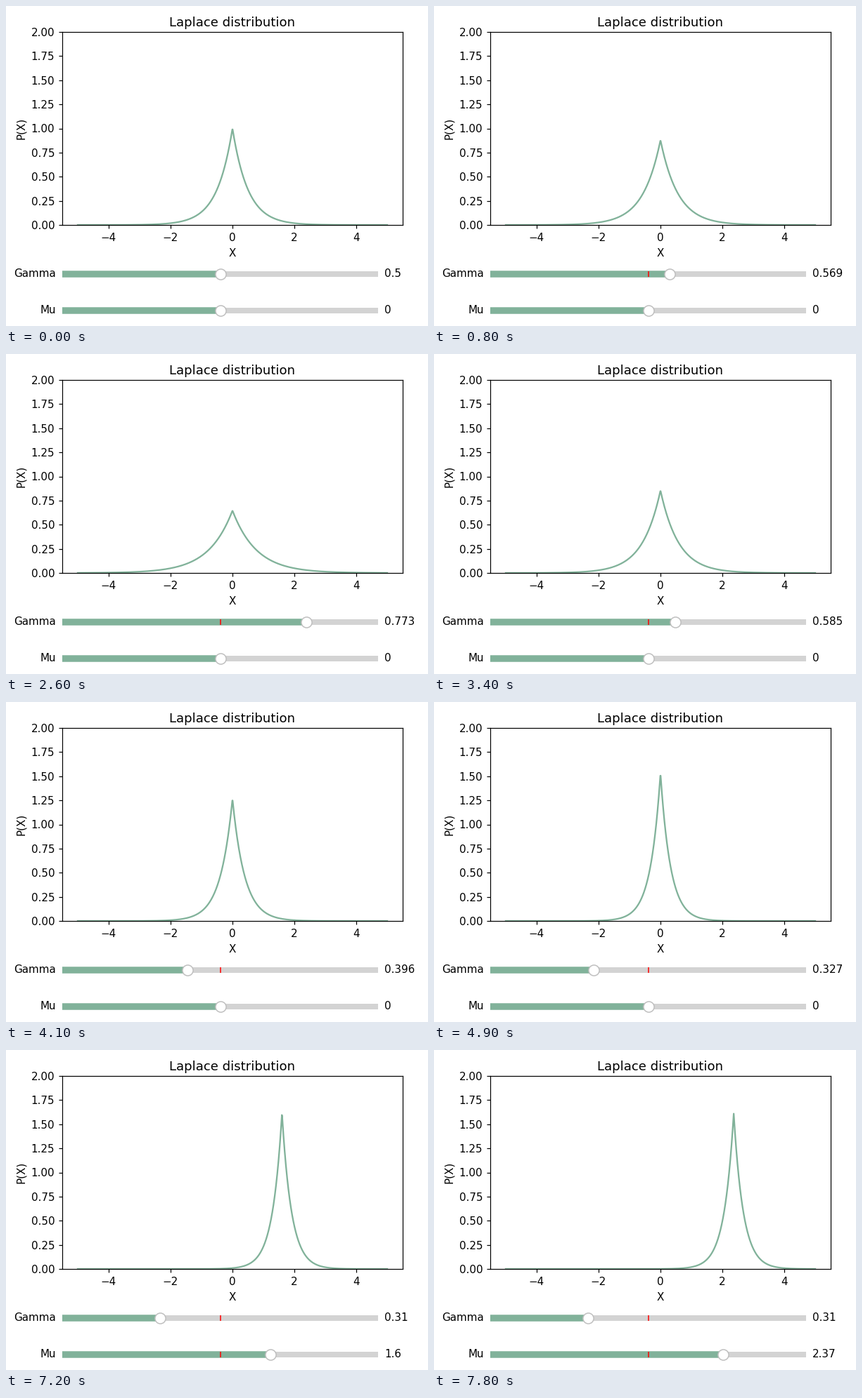
Recreate the animation shown at these times as a matplotlib script. Size 600x456 px, loop 8 s.

```python
import numpy as np
import matplotlib.pyplot as plt
from matplotlib.animation import FuncAnimation
from matplotlib.patches import Rectangle

W, H, DPI = 600, 456, 120
K = 109 / DPI  # point sizes are designed for 109 dpi
GREEN = "#81b29a"
FRAMES, STEP = 80, 100

plt.rcParams.update({
    "font.family": "DejaVu Sans",
    "font.size": 10 * K,
    "axes.titlepad": 5.5 * K,
    "axes.labelpad": 4.7 * K,
    "axes.linewidth": 0.8 * K,
    "lines.linewidth": 1.5 * K,
    "lines.markeredgewidth": K,
})


def box(left, top, right, bottom):
    """Pixel edges, measured from the top left, as a figure rectangle."""
    return [left / W, 1 - bottom / H, (right - left) / W, (bottom - top) / H]


class Track:
    """A horizontal slider with a handle, a start mark and a value label."""

    def __init__(self, fig, name, cy, low, high, places):
        self.low, self.places = low, places
        ax = fig.add_axes(box(80, cy - 8, 529, cy + 8))
        ax.set_axis_off()
        ax.set(xlim=(low, high), ylim=(0, 1))
        start = (low + high) / 2
        rail = ax.add_patch(Rectangle((low, 0.25), high - low, 0.5,
                                      facecolor="lightgrey", lw=0))
        self.fill = ax.add_patch(Rectangle((low, 0.25), start - low, 0.5,
                                           color=GREEN, lw=K))
        mark = ax.axvline(start, color="red", lw=K)
        mark.set_clip_path(rail)
        self.handle, = ax.plot([start], [0.5], "o", ms=10 * K, mfc="white",
                               mec="0.75", clip_on=False)
        ax.text(-0.02, 0.5, name, transform=ax.transAxes,
                ha="right", va="center")
        self.text = ax.text(1.02, 0.5, "", transform=ax.transAxes,
                            ha="left", va="center")

    def label(self, value):
        """Drop decimals while the rounding error stays below one step."""
        places, tol = self.places, 10.0 ** -self.places
        while places and abs(value - round(value, places - 1)) < tol:
            places -= 1
        return f"{value:.{places}f}".replace("-", "\u2212")

    def set(self, value):
        self.fill.set_width(value - self.low)
        self.handle.set_xdata([value])
        self.text.set_text(self.label(value))


# Where each drag changes pace: (tick, value).
GAMMA_PATH = [(2, 0.5), (5, 0.524), (13, 0.6433), (21, 0.775), (26, 0.7733),
              (31, 0.6856), (37, 0.4844), (41, 0.3956), (51, 0.31)]
MU_PATH = [(62, 0), (63, -0.08), (64, 0.03), (67, 0.98), (69, 1.26),
           (72, 1.6), (77, 2.3667)]


def along(path, tick):
    return float(np.interp(tick, *zip(*path)))


fig = plt.figure(figsize=(W / DPI, H / DPI), dpi=DPI, facecolor="white")
ax = fig.add_axes(box(80, 37, 564, 312))
ax.set(xlim=(-5.5, 5.5), ylim=(0, 2), xlabel="X", ylabel="P(X)")
ax.set_title("Laplace distribution")
ax.set_xticks(range(-4, 5, 2))
ax.set_yticks(np.arange(0, 2.1, 0.25))
ax.tick_params(length=3.5 * K, width=0.8 * K, pad=3.5 * K)

x = np.linspace(-5, 5, 1000)
curve, = ax.plot(x, np.zeros_like(x), color=GREEN)
gamma_track = Track(fig, "Gamma", 382, 0, 1, 3)
mu_track = Track(fig, "Mu", 434, -5, 5, 2)


def draw(frame):
    tick = frame - (frame % 8 == 6)  # the drag skips an update now and then
    gamma, mu = along(GAMMA_PATH, tick), along(MU_PATH, tick)
    curve.set_ydata(np.exp(-np.abs(x - mu) / gamma) / (2 * gamma))
    gamma_track.set(gamma)
    mu_track.set(mu)
    return curve,


anim = FuncAnimation(fig, draw, frames=FRAMES, interval=STEP,
                     init_func=lambda: draw(0), repeat=True, repeat_delay=0)
plt.show()
```
